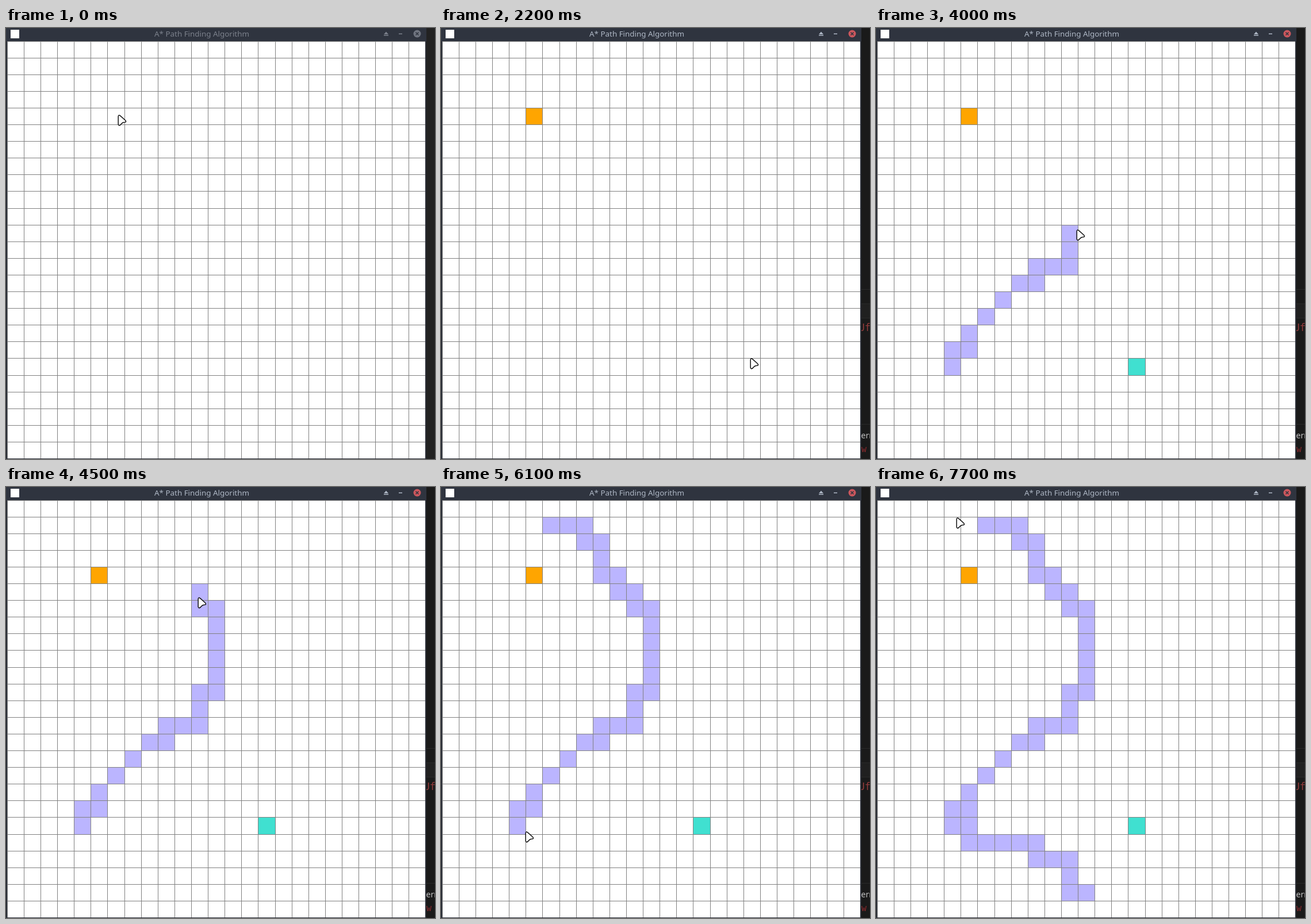
These frames come from a looping animation (746x751 px, 8 s). An HTML page with a canvas:

```html
<!DOCTYPE html>
<html lang="en">
<head>
<meta charset="utf-8">
<title>A* Path Finding Algorithm</title>
<style>
html, body { margin: 0; width: 100%; height: 100%; overflow: hidden; background: #222; }
canvas { display: block; }
</style>
</head>
<body>
<canvas id="stage" width="746" height="751"></canvas>
<script>
const ctx = document.getElementById('stage').getContext('2d');
const LOOP = 8000, STEP = 100, CELLS = 25;
const FOCUS = 200, START = 800, GOAL = 2700;

// Pointer moves in cell units: start, end, path from the last point, button held
const moves = [
  [0, 400, 'L5.14 3.68'],
  [800, 900, 'L5.25 4.3'],
  [1200, 2000, 'L18.82 18.8'],
  [2000, 2200, 'L18.4 18.97'],
  [2200, 2400, 'L15.45 19.42'],
  [3000, 3500, 'L4.3 19.5'],
  [3500, 4000, 'L5.5 17.5L8.5 14.5L11.5 13.3L11.91 11.27', true],
  [4000, 4900, 'L12.3 11.1L12.5 6.6L9.5 4.4L9.3 2.4L8.72 2.1', true],
  [4900, 5200, 'L6.5 1.2', true],
  [5200, 5700, 'Q2.7 8 4.18 17.87'],
  [5700, 6100, 'L4.97 19.83'],
  [6100, 6600, 'L9.3 20.6L11.5 22.3', true],
  [6600, 6900, 'L11.7 23.2L12.43 23.4', true],
  [7000, 7700, 'L4.73 1.03']
];

let last = { x: 6.62, y: 4.4 };
const legs = moves.map(([start, end, d, held]) => {
  const path = document.createElementNS('http://www.w3.org/2000/svg', 'path');
  path.setAttribute('d', `M${last.x} ${last.y}${d}`);
  const length = path.getTotalLength();
  const at = f => path.getPointAtLength(f * length);
  last = at(1);
  return { start, end, held, length, at };
});

// Each cell crossed with the button held becomes a wall
const walls = new Map();
for (const { start, end, length, at } of legs.filter(leg => leg.held)) {
  const count = Math.ceil(length / 0.02);
  for (let i = 0; i <= count; i++) {
    const p = at(i / count), c = Math.floor(p.x), r = Math.floor(p.y);
    const key = c + r * CELLS;
    if (!walls.has(key)) walls.set(key, { c, r, time: start + (end - start) * i / count });
  }
}

const toX = c => 2.24 + 29.112 * c;
const toY = r => 23.05 + 29.1 * r;
const gridX = c => Math.floor(toX(c));
const gridY = r => Math.floor(toY(r));

function rect(color, x, y, w, h) {
  ctx.fillStyle = color;
  ctx.fillRect(x, y, w, h);
}

function text(str, x, y, font, color, align = 'left') {
  ctx.font = font;
  ctx.fillStyle = color;
  ctx.textAlign = align;
  ctx.fillText(str, x, y);
}

function cell(color, c, r) {
  const x = gridX(c), y = gridY(r);
  rect(color, x, y, gridX(c + 1) - x, gridY(r + 1) - y);
}

function titleBar(active) {
  const tint = active ? '#afb8c6' : '#7c818c';
  rect('#2f343f', 0, 0, 731, 23);
  rect('#fff', 8, 3, 15, 15);
  text('A* Path Finding Algorithm', 340.5, 15, '13.4px "Noto Sans", sans-serif', tint, 'center');
  ctx.fillStyle = tint;
  ctx.fill(new Path2D('M657 11L661 6.5L665 11ZM657 12H665V13.5H657ZM683 9.5H689V11H683Z'));
  ctx.fillStyle = active ? '#cc575d' : '#707580';
  ctx.beginPath();
  ctx.arc(715, 10, 6.5, 0, 7);
  ctx.fill();
  ctx.strokeStyle = '#2f343f';
  ctx.lineWidth = 1.5;
  ctx.stroke(new Path2D('M712.5 7.5L717.5 12.5M717.5 7.5L712.5 12.5'));
}

function sidePanel() {
  const mono = '"DejaVu Sans Mono", monospace';
  rect('#1a1a1a', 731, 0, 15, 751);
  rect('#202020', 731, 480, 15, 25);
  for (const y of [455, 480, 505, 690]) rect('#2a2a2a', 731, y, 15, 1);
  ctx.save();
  ctx.beginPath();
  ctx.rect(731, 0, 15, 751);
  ctx.clip();
  text('Uf', 726.5, 528, '17px ' + mono, '#943c3c');
  text('ern', 730.5, 715, '14px "Noto Sans", sans-serif', '#c0c0c0');
  text('w', 731, 739, '15px ' + mono, '#8c2a2e');
  ctx.restore();
}

function board(t) {
  rect('#2b2e37', 0, 23, 731, 728);
  rect('#fff', 2, 23, 727, 727);
  for (const { c, r, time } of walls.values()) if (t >= time) cell('#bbb5ff', c, r);
  if (t >= START) cell('#ffa500', 5, 4);
  if (t >= GOAL) cell('#40e0d0', 15, 19);
  for (let i = 0; i < CELLS; i++) {
    rect('#808080', gridX(i), 23, 1, 727);
    rect('#808080', 2, gridY(i), 727, 1);
  }
}

function pointer(t) {
  const leg = legs.findLast(l => l.start <= t);
  const p = leg.at(Math.min(1, (t - leg.start) / (leg.end - leg.start)));
  const shape = new Path2D('M.8 3.2Q1-.2 4 1.6L13 9.8Q15.8 13 12 13.3Q8 13.3 5 17.4Q1.8 20.4 .8 16.8Z');
  ctx.save();
  ctx.translate(Math.round(toX(p.x)) - 0.6, Math.round(toY(p.y)));
  ctx.fillStyle = '#fff';
  ctx.fill(shape);
  ctx.strokeStyle = '#111';
  ctx.lineWidth = 1.5;
  ctx.stroke(shape);
  ctx.restore();
}

function draw(t) {
  const active = t >= FOCUS;
  rect('#222', 0, 0, 746, 751);
  if (active) sidePanel();
  titleBar(active);
  board(t);
  pointer(t);
}

function frame(now) {
  draw(Math.floor(now % LOOP / STEP) * STEP);
  requestAnimationFrame(frame);
}
requestAnimationFrame(frame);
</script>
</body>
</html>
```
